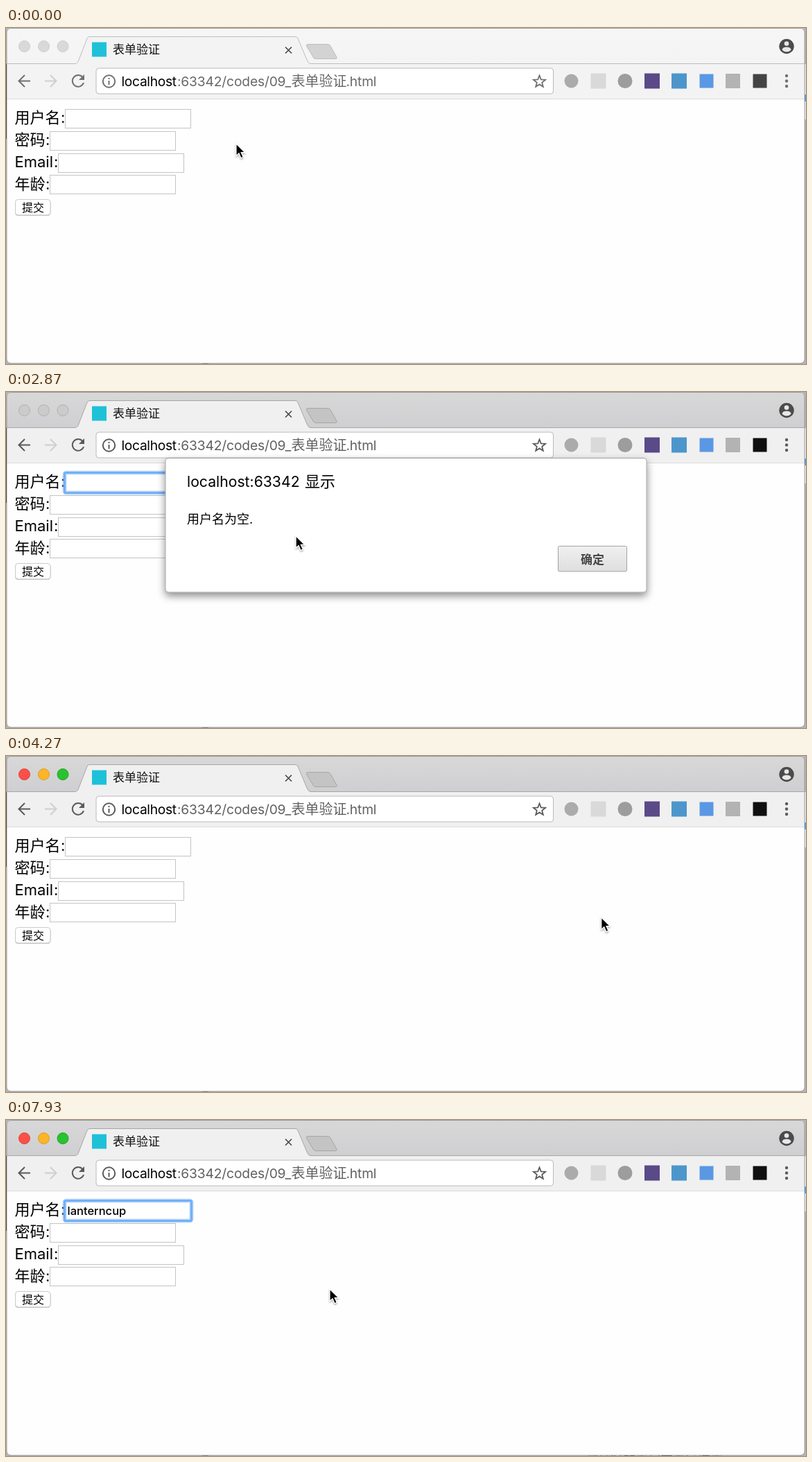
Write an HTML page that moves like this. It is 1154 px wide and 485 px high and loops after 8000 ms.

```html
<!DOCTYPE html>
<html lang="zh">
<head>
<meta charset="utf-8">
<title>表单验证</title>
<style>
  html, body { margin: 0; width: 100%; height: 100%; overflow: hidden; background: #b4b4b4; }
  svg {
    display: block; width: 100vw; height: 100vh;
    font-family: Inter, "Noto Sans CJK SC", "Noto Sans CJK", "Open Sans", sans-serif;
    --bar1: #d8d8d9; --bar2: #cfcfd1; --tool: #f0f0f0; --edge: #a6a6a6;
    --plus: #c4c4c4; --icon: #5a5a5a; --dark: #101010; --url: #606060;
  }
  svg.idle {
    --bar1: #f6f6f6; --bar2: #f4f4f4; --tool: #f3f3f3; --edge: #bdbdbd;
    --plus: #d3d3d3; --icon: #707070; --dark: #444; --url: #686868;
  }
  .edge { stroke: var(--edge); }
  .tool { fill: var(--tool); }
  .icon { fill: none; stroke: var(--icon); stroke-width: 2; }
  .fill { fill: var(--icon); }
  .url { font-size: 19.3px; letter-spacing: -.35px; }
  .url .rest { fill: var(--url); letter-spacing: -.2px; }
  .url .han { letter-spacing: 0; font-size: 20px; }
  .form { font-size: 22px; }
  .box { fill: #fff; stroke: #c4c4c4; }
</style>
</head>
<body>
<svg id="stage" viewBox="0 0 1154 485" preserveAspectRatio="none">
  <defs>
    <linearGradient id="bar" x2="0" y2="1">
      <stop style="stop-color:var(--bar1)"/><stop offset="1" style="stop-color:var(--bar2)"/>
    </linearGradient>
    <linearGradient id="okFill" x2="0" y2="1">
      <stop id="okTop" stop-color="#f0f0f0"/><stop id="okEnd" offset="1" stop-color="#dedede"/>
    </linearGradient>
    <filter id="lift" x="-10%" y="-15%" width="120%" height="145%">
      <feDropShadow dx="0" dy="5" stdDeviation="6" flood-opacity=".45"/>
    </filter>
    <filter id="soft" x="-60%" y="-40%" width="220%" height="200%">
      <feDropShadow dx="0" dy="1.5" stdDeviation="1.2" flood-opacity=".4"/>
    </filter>
    <clipPath id="win"><rect x="1" width="1151" height="484" rx="6"/></clipPath>
  </defs>

  <rect width="1154" height="485" fill="#b4b4b4"/>
  <rect y="52" width="1.500" height="108" fill="#222"/>
  <rect x="283" y="483" width="9" height="2" fill="#777"/>
  <rect x="1152" y="52" width="2" height="80" fill="#e4e4e4"/>
  <rect x="1152" y="96" width="2" height="10" fill="#5b9bd5"/>
  <text id="behind" x="836" y="497" font-size="18" fill="#444">测试时的中间空白区域内</text>

  <g clip-path="url(#win)">
    <rect width="1154" height="485" fill="#fefefe"/>
    <rect width="1154" height="52" fill="url(#bar)"/>
    <rect class="tool" y="51.500" width="1154" height="51"/>
    <path class="edge" d="M0 51.500H1154"/>
    <path d="M0 102.500H1154" stroke="#dcdcdc"/>
    <path class="tool edge" d="M100 51.500C103 51 104 49 105 46L117 15Q118 12.500 121 12.500H417Q420 12.500 421 15L434 46Q436 51 439 51.500"/>
    <path class="tool" d="M101 51H438V53H101Z"/>
    <path class="edge" style="fill:var(--plus)" d="M436 23.500H464Q467 23.500 468 26L477 42Q478 44.500 475 44.500H447Q444 44.500 443 42L433.500 26Q432.500 23.500 436 23.500Z"/>
    <g id="lights"></g>

    <rect x="124" y="20.500" width="21" height="21" fill="#1fc1d8"/>
    <text x="154" y="37" font-size="17" fill="#111">表单验证</text>
    <path d="M403 27.500l9 9m0-9l-9 9" stroke="#4a4a4a" stroke-width="1.700"/>

    <circle cx="1126" cy="26.500" r="10.700" fill="#4b4b4b"/>
    <circle cx="1126" cy="22.500" r="3.300" fill="#e8e8e8"/>
    <path d="M1119.500 31.500Q1120 27.500 1126 27.500T1132.500 31.500Q1130 34.500 1126 34.500T1119.500 31.500Z" fill="#e8e8e8"/>

    <path class="icon" d="M35 76.500H19M27 68L18.500 76.500L27 85"/>
    <path class="icon" style="stroke:#cfcfcf" d="M56 76.500H72M64 68L72.500 76.500L64 85"/>
    <path class="icon" d="M110.500 71A8.300 8.300 0 1 0 112 79"/>
    <path class="fill" d="M113 67V75H105Z"/>

    <rect x="130" y="58" width="659.500" height="37" rx="4" fill="#fff" stroke="#bababa"/>
    <circle class="icon" cx="148.500" cy="77" r="8.700"/>
    <path class="icon" d="M148.500 76V82M148.500 72V74"/>
    <g class="url">
      <text x="166.500" y="83.700">localhost</text>
      <g class="rest">
        <text x="247" y="83.700">:63342/codes/09_</text>
        <text class="han" x="411.500" y="83.700">表单验证</text>
        <text x="490.500" y="83.700">.html</text>
      </g>
    </g>
    <path id="star" class="icon" style="stroke-width:1.800"/>
    <g id="tools"></g>
    <g class="fill">
      <circle cx="1126" cy="69" r="2.200"/><circle cx="1126" cy="76.500" r="2.200"/><circle cx="1126" cy="84" r="2.200"/>
    </g>

    <g id="form" class="form"></g>
    <rect x="13" y="248" width="51.500" height="23" rx="4.500" fill="#b5b5b5"/>
    <rect x="13.500" y="247.500" width="50.500" height="22.500" rx="4" fill="#fff" stroke="#cbcbcb"/>
    <text x="23" y="264.500" font-size="16" font-weight="500">提交</text>

    <g id="ring" fill="none" stroke="#72b0f7">
      <rect x="84.500" y="116.500" width="183" height="29" rx="2.500" stroke-width="6" opacity=".45"/>
      <rect x="84.500" y="116.500" width="183" height="29" rx="1.500" stroke-width="3.200"/>
    </g>
    <text id="typed" x="88.500" y="137" font-size="16.500" font-weight="500"></text>
    <rect id="caret" y="120" width="1.200" height="21"/>

    <g id="dialog">
      <rect x="230" y="95.500" width="694" height="193.500" rx="4" fill="#fff" stroke="#a2a2a2" filter="url(#lift)"/>
      <text x="261" y="137" font-size="21.200">localhost:63342</text>
      <text x="431" y="137" font-size="22">显示</text>
      <text x="261" y="190" font-size="18">用户名为空.</text>
      <rect id="okBox" x="796.500" y="222.500" width="99" height="36.500" rx="2" fill="url(#okFill)"/>
      <text id="okText" x="829" y="247.500" font-size="17" font-weight="700">确定</text>
    </g>
  </g>
  <rect x="1" y=".500" width="1151" height="483.500" rx="6" fill="none" stroke="#8d8d8d" stroke-opacity=".8"/>

  <path id="arrow" d="M0 0V17.500L4 13.800L7 20.700L10.200 19.300L7.200 12.600H12.600Z" stroke="#fff" stroke-width="1.200" filter="url(#soft)"/>
  <g id="beam" fill="none">
    <path id="beamShape" d="M-4.500 -9.500Q-.5 -9.500 0 -7Q.5 -9.500 4.500 -9.500M-4.500 10Q-.5 10 0 7.500Q.5 10 4.500 10M0 -7.500V8M-2.500 2.500H2.500" stroke="#fff" stroke-width="3.500" opacity=".8"/>
    <path d="M-4.500 -9.500Q-.5 -9.500 0 -7Q.5 -9.500 4.500 -9.500M-4.500 10Q-.5 10 0 7.500Q.5 10 4.500 10M0 -7.500V8M-2.500 2.500H2.500" stroke="#111" stroke-width="1.600"/>
  </g>
</svg>
<script>
const $ = id => document.getElementById(id);
const NS = 'http://www.w3.org/2000/svg';
function add(parent, tag, attrs, text) {
  const el = document.createElementNS(NS, tag);
  for (const k in attrs) el.setAttribute(k, attrs[k]);
  if (text) el.textContent = text;
  parent.appendChild(el);
  return el;
}
const show = (el, on) => el.setAttribute('visibility', on ? 'visible' : 'hidden');

const lights = [26.5, 54.5, 82].map(cx => add($('lights'), 'circle', { cx, cy: 26.5, r: 8 }));
const lightLooks = {
  idle: [['#d9d9d9', '#cdcdcd']],
  modal: [['#cbcbcb', '#b1b1b1']],
  active: [['#fb5048', '#df4039'], ['#fbb528', '#dd9d20'], ['#29c231', '#1fa427']]
};

let star = '';
for (let i = 0; i < 10; i++) {
  const r = i % 2 ? 3.9 : 9, a = (i / 5 - 0.5) * Math.PI;
  star += (i ? 'L' : 'M') + (769.5 + r * Math.cos(a)) + ' ' + (77.5 + r * Math.sin(a));
}
$('star').setAttribute('d', star + 'Z');

// Toolbar buttons: centre x, size, colour, round
[[815.5, 20, '#ababab', 1], [854.5, 22, '#d9d9d9', 0], [893, 21, '#9d9d9d', 1],
 [932, 22, '#5a4a88', 0], [971, 22, '#4d96cb', 0], [1010.5, 20, '#5b98e4', 0],
 [1048.5, 21, '#b3b3b3', 0], [1087.5, 20, 'var(--dark)', 0]
].forEach(([x, size, color, round]) => add($('tools'), 'rect', {
  x: x - size / 2, y: 76.5 - size / 2, width: size, height: size,
  rx: round ? size / 2 : 0, style: 'fill:' + color
}));

[['用户名', 85.5], ['密码', 63.5], ['Email', 75.5], ['年龄', 63.5]].forEach(([label, x], i) => {
  const y = 137 + i * 32;
  add($('form'), 'text', { x: 12.5, y }, label);
  add($('form'), 'text', { x: x - 6.5, y }, ':');
  add($('form'), 'rect', { class: 'box', x, y: 117.5 + Math.round(i * 31.8), width: 181, height: 27 });
});

const LOOP = 8000;
const word = 'lanterncup';
const keys = [5860, 6000, 6195, 6395, 6660, 6795, 6995, 7125, 7195, 7325];
const wake = 1325, alertAt = 2860, closeAt = 4260;
const path = [
  [0, 332, 167], [660, 332, 167], [1130, 300, 150], [1260, 300, 150], [2060, 199, 137],
  [2460, 199, 137], [2925, 428, 211], [3270, 428, 211], [4060, 859, 233],
  [4260, 859, 233], [4860, 217, 130], [7920, 217, 130], [7925, 467, 244]
];

function pointer(t) {
  let i = 0;
  while (i < path.length - 1 && path[i + 1][0] <= t) i++;
  const a = path[i], b = path[i + 1] || a;
  const u = b === a ? 0 : (t - a[0]) / (b[0] - a[0]);
  const e = u * u * (3 - 2 * u);
  return [a[1] + (b[1] - a[1]) * e, a[2] + (b[2] - a[2]) * e];
}

const between = (t, a, b) => t >= a && t < b;

function draw(ms) {
  const t = Math.floor(ms * 0.015 + 0.06) / 0.015;
  const idle = t < wake, modal = between(t, alertAt, closeAt);
  const focused = between(t, 2260, closeAt) || t >= 5125;

  $('stage').setAttribute('class', idle ? 'idle' : '');
  const looks = lightLooks[idle ? 'idle' : modal ? 'modal' : 'active'];
  lights.forEach((el, i) => {
    const [fill, stroke] = looks[i % looks.length];
    el.setAttribute('fill', fill);
    el.setAttribute('stroke', stroke);
  });

  const count = keys.filter(k => k <= t).length;
  $('typed').textContent = word.slice(0, count);
  show($('ring'), focused);
  const blink = count ? t < 7860 : between(t, 2260, 2760) || between(t, 5125, 5660);
  show($('caret'), blink);
  $('caret').setAttribute('x', 88.8 + (count ? $('typed').getComputedTextLength() : 0));

  const [x, y] = pointer(t);
  show($('dialog'), modal);
  const hover = x > 796 && x < 896 && y > 222 && y < 259;
  $('okTop').setAttribute('stop-color', hover ? '#f8f8f8' : '#f0f0f0');
  $('okEnd').setAttribute('stop-color', hover ? '#e4e4e4' : '#dedede');
  $('okBox').setAttribute('stroke', hover ? '#808080' : '#a3a3a3');
  $('okText').setAttribute('fill', hover ? '#111' : '#444');

  const inField = !idle && !modal && x > 85 && x < 267 && y > 117 && y < 145;
  const hidden = between(t, keys[0], 7925);
  show($('arrow'), !hidden && !inField);
  show($('beam'), !hidden && inField);
  const move = `translate(${x} ${y})`;
  $('arrow').setAttribute('transform', move);
  $('beam').setAttribute('transform', move);
  show($('behind'), t >= keys[0]);
}

let start;
function tick(now) {
  if (start === undefined) start = now;
  draw((now - start) % LOOP);
  requestAnimationFrame(tick);
}
draw(0);
requestAnimationFrame(tick);
</script>
</body>
</html>
```
